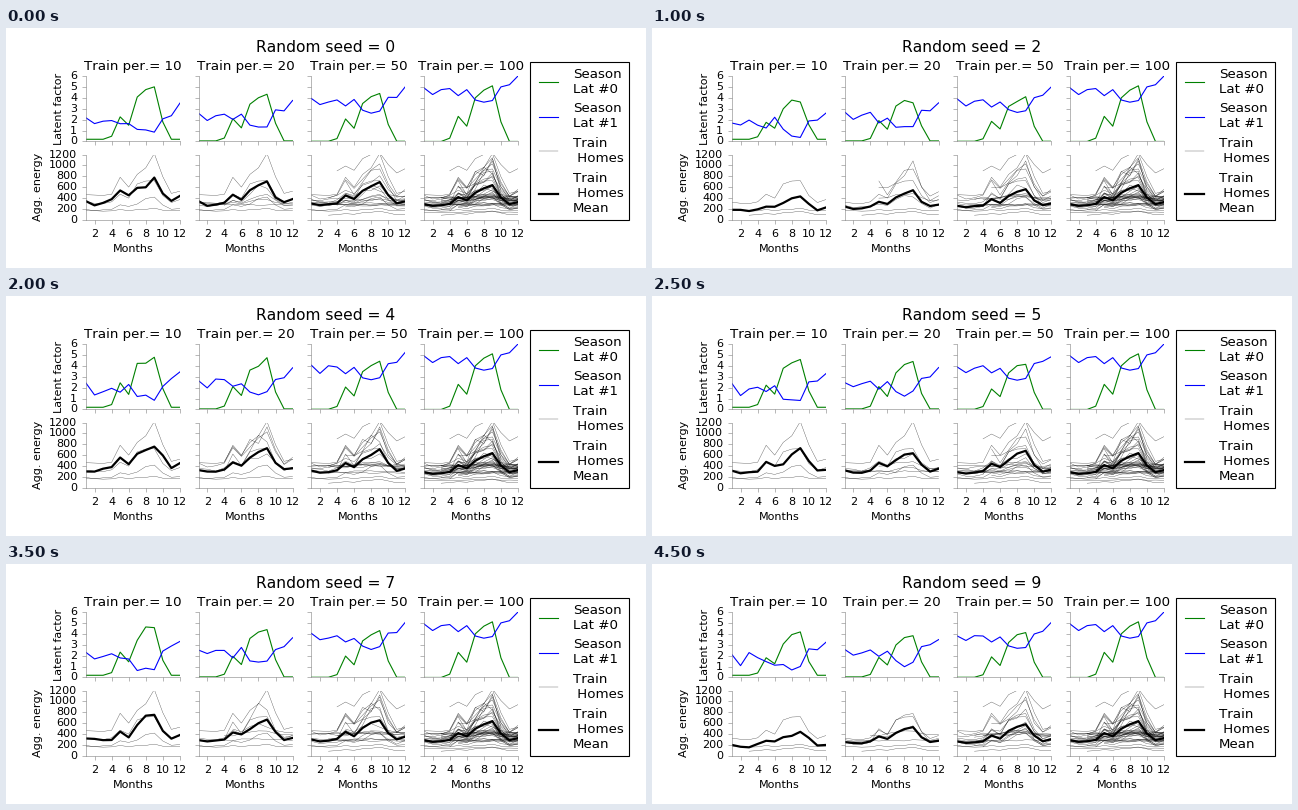
A matplotlib script that plays this animation: 640x240 px, repeating every 5000 ms.

```python
import random

import numpy as np
import matplotlib.pyplot as plt
from matplotlib.animation import FuncAnimation

plt.rcParams.update({
    "font.family": "DejaVu Sans", "font.size": 10, "text.kerning_factor": 6,
    "axes.titlesize": 12, "axes.titlepad": 5, "axes.labelpad": 5,
    "axes.linewidth": 0.5, "axes.edgecolor": "gray",
    "axes.spines.top": False, "axes.spines.right": False,
    "lines.linewidth": 1, "lines.solid_capstyle": "projecting",
    "ytick.alignment": "center",
})
for side in ("xtick", "ytick"):
    plt.rcParams.update({
        f"{side}.direction": "out", f"{side}.color": "gray",
        f"{side}.labelcolor": "black", f"{side}.major.size": 4,
        f"{side}.major.pad": 4, f"{side}.major.width": 0.5,
    })

MONTHS = np.arange(1, 13)

# Monthly curves learnt from all homes
SEASON_0 = np.array([0, 0, 0, .3, 2.3, 1.4, 4, 4.7, 5.1, 1.8, 0, 0])
SEASON_1 = np.array([4.9, 4.3, 4.75, 4.85, 4.2, 4.75,
                     3.8, 3.6, 3.75, 5, 5.2, 6])
ENERGY = np.array([290, 260, 270, 295, 420, 360, 500, 580, 640, 410, 290, 330])
YEAR = (ENERGY - ENERGY.min()) / np.ptp(ENERGY)

# Energy level of the homes drawn by each seed, relative to all homes
LEVELS = (1.2, 1, .65, 1.15, 1.25, 1.1, 1.05, 1.1, 1.6, .7)

# Homes per panel: (sampling bias, drop of season 1, noise, extra homes)
PANELS = {
    10: (1, 2.75, .25, 0),
    20: (.5, 2.3, .12, 4),
    50: (.3, .95, .08, 14),
    100: (0, 0, 0, 36),
}


def panel_curves(seed, size):
    """Two latent factors and the mean energy learnt from a sample."""
    bias, drop, noise, _ = PANELS[size]
    rng = np.random.default_rng(100 * seed + size)
    shift = (LEVELS[seed] - 1) * bias
    jitter = rng.normal(0, noise, (3, 12))
    gain = 1 if size == 100 else .83 + .4 * shift
    season0 = SEASON_0 * gain * (1 + .3 * jitter[0]) + .2 * bias ** 2
    season1 = SEASON_1 - drop + .5 * shift + jitter[1]
    mean = ENERGY * (1 + shift) * (1 + .3 * jitter[2])
    return season0.clip(0), season1.clip(0), mean


def make_home(rng, base, swing, first):
    """One home's year, reported from month index `first` on."""
    wobble = rng.normal(1, .15, 12)
    year = base + swing * YEAR * wobble + rng.normal(0, .04 * base, 12)
    return MONTHS[first:], year[first:]


rng = np.random.default_rng(5)
KEY_HOMES = ((430, 720, 0), (180, 250, 0), (165, 40, 0),
             (300, 500, 0), (90, 70, 2), (800, 480, 3))
homes = [make_home(rng, *key) for key in KEY_HOMES]
for _ in range(PANELS[100][-1]):
    homes.append(make_home(rng, rng.uniform(130, 440),
                           720 * rng.random() ** 1.8,
                           rng.choice([0, 0, 0, 2, 3, 4])))


def pick(seed, size):
    """Homes in a sample; larger samples contain the smaller ones."""
    keys = range(0, 4) if LEVELS[seed] > 1 else range(2, 5)
    if size >= 50:
        keys = range(len(KEY_HOMES))
    extra = list(range(len(KEY_HOMES), len(homes)))
    random.Random(seed).shuffle(extra)
    return {*keys, *extra[:PANELS[size][-1]]}


fig, axes = plt.subplots(2, 4, figsize=(8, 3), dpi=80, facecolor="white")
fig.subplots_adjust(left=.125, right=.8, bottom=.2, top=.8,
                    wspace=.2, hspace=.2)
title = fig.suptitle("Random seed = 0", x=.5, y=.95, va="top", fontsize=14)

panels = []
for col, size in enumerate(PANELS):
    top, low = axes[:, col]
    green, = top.plot(MONTHS, SEASON_0, color="green")
    blue, = top.plot(MONTHS, SEASON_1, color="blue")
    thin = [low.plot(x, y, color="black", lw=.3, alpha=.8)[0]
            for x, y in homes]
    mean, = low.plot(MONTHS, ENERGY, color="black", lw=2)
    panels.append((size, (green, blue, mean), thin))

    top.set_title(f"Train per.= {size}", y=1)
    top.set(ylim=(0, 6), yticks=range(7))
    low.set(ylim=(0, 1200), yticks=range(0, 1201, 200), xlabel="Months")
    for ax in (top, low):
        ax.set(xlim=(1, 12), xticks=range(2, 13, 2))
        ax.tick_params(labelleft=col == 0, labelbottom=ax is low)
axes[0, 0].set_ylabel("Latent factor")
axes[1, 0].set_ylabel("Agg. energy")

legend = fig.legend(
    [green, blue, thin[0], mean],
    ["Season\nLat #0", "Season\nLat #1", "Train\n Homes",
     "Train\n Homes\nMean"],
    loc="center left", bbox_to_anchor=(524 / 640, 126.7 / 240),
    borderaxespad=0, fontsize=12, numpoints=2, fancybox=False,
    edgecolor="black", framealpha=1, borderpad=.4, labelspacing=.5,
    handlelength=2, handletextpad=.8)
legend.get_frame().set_linewidth(1)


def draw(seed):
    title.set_text(f"Random seed = {seed}")
    for size, lines, thin in panels:
        for line, values in zip(lines, panel_curves(seed, size)):
            line.set_ydata(values)
        chosen = pick(seed, size)
        for i, line in enumerate(thin):
            line.set_visible(i in chosen)
    return []


anim = FuncAnimation(fig, draw, frames=len(LEVELS), interval=500,
                     repeat=True, repeat_delay=0, blit=False)
plt.show()
```
